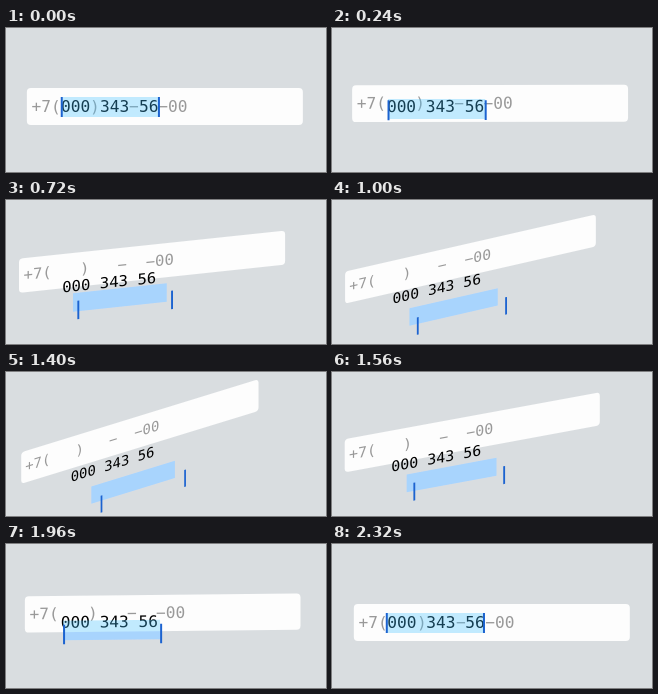
Animation of 320 by 144 pixels, one loop 2.36 s. Source, as an HTML page:

```html
<!DOCTYPE html>
<html lang="en">
<head>
<meta charset="utf-8">
<title>Phone field layers</title>
<style>
  html, body { margin: 0; height: 100%; overflow: hidden; background: #d9dde0; }
  svg { display: block; width: 320px; height: 144px; }
  text { font: 16.2px "DejaVu Sans Mono", monospace; white-space: pre; }
</style>
</head>
<body>
<svg viewBox="0 0 320 144">
  <!-- tint that shows only where the selection leaves the field -->
  <g data-z="30"><rect x="55.3" y="69" width="97.2" height="20" fill="#d9ddfc"/></g>
  <g data-z="-50">
    <rect x="21.3" y="60" width="276" height="37" rx="4" fill="#fdfdfd"/>
    <text x="26" y="83.7" fill="#999">+7(   )   −  −00</text>
  </g>
  <g data-z="-10"><text x="55.1" y="84.4">000 343 56</text></g>
  <g data-z="30"><rect x="55.3" y="69" width="97.2" height="20" fill="#43c2ff" fill-opacity=".32"/></g>
  <g data-z="50" fill="#1c63d0">
    <rect x="54.3" y="69" width="2" height="20"/>
    <rect x="151.5" y="69" width="2" height="20"/>
  </g>
</svg>
<script>
const LOOP = 2360, STEP = 40, PX = 160, PY = 100;
// time in ms, pitch and yaw in degrees
const KEYS = [
  [120, 0, .5], [440, 14.6, 5.4], [680, 21.5, 14], [1000, 29.7, 24.7], [1280, 31.5, 31.5],
  [1400, 31.2, 30.7], [1720, 20.8, 13.3], [1800, 17, 9.7], [1960, 11.5, 3], [2320, 0, -.6]
];
const layers = [...document.querySelectorAll("g")];

function slope(i, k) {
  const a = KEYS[i - 1], b = KEYS[i + 1];
  return a && b ? (b[k] - a[k]) / (b[0] - a[0]) : 0;
}

// Smooth curve through the keys, returned in radians
function angle(t, k) {
  t = Math.min(Math.max(t, KEYS[0][0]), KEYS.at(-1)[0]);
  const i = Math.max(1, KEYS.findIndex(key => key[0] >= t));
  const a = KEYS[i - 1], b = KEYS[i], span = b[0] - a[0];
  const s = (t - a[0]) / span, r = 1 - s;
  const deg = r * r * (1 + 2 * s) * a[k] + s * s * (1 + 2 * r) * b[k]
    + span * s * r * (r * slope(i - 1, k) - s * slope(i, k));
  return deg * Math.PI / 180;
}

function draw(now) {
  const t = Math.floor(now % LOOP / STEP) * STEP;
  const pitch = angle(t, 1), yaw = angle(t, 2);
  const sp = Math.sin(pitch), cp = Math.cos(pitch);
  const sy = Math.sin(yaw), cy = Math.cos(yaw);
  for (const g of layers) {
    const z = +g.dataset.z;
    const dx = PX - cy * PX + z * sy;
    const dy = PY + sp * sy * PX - cp * PY + z * sp * cy;
    g.setAttribute("transform", `matrix(${[cy, -sp * sy, 0, cp, dx, dy].map(v => v.toFixed(5))})`);
  }
}

const start = performance.now();
function tick() {
  draw(performance.now() - start);
  requestAnimationFrame(tick);
}
tick();
</script>
</body>
</html>
```
